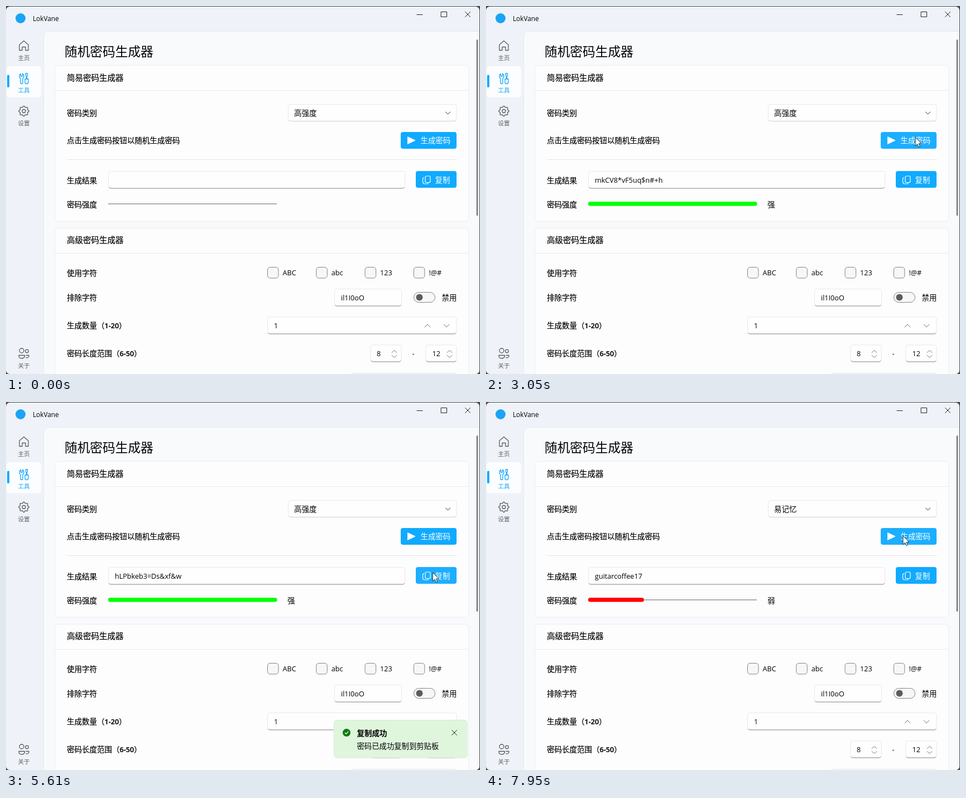
Recreate the animation shown at these times as an HTML page. Size 849x660 px, loop 8 s.

```html
<!DOCTYPE html>
<html lang="zh-CN">
<head>
<meta charset="utf-8">
<title>随机密码生成器</title>
<style>
html, body { margin: 0; width: 100%; height: 100%; overflow: hidden; background: #4a4a4a; }
svg { display: block; width: 849px; height: 660px; }
text { font-family: "Open Sans", "Noto Sans CJK SC", "Noto Sans CJK", sans-serif; fill: #000; white-space: pre; }
.label { font-weight: 500; stroke: #000; stroke-width: .2; }
.icon { fill: none; stroke: #5c5c5c; stroke-width: 1.3; stroke-linecap: round; stroke-linejoin: round; }
.active { stroke: #10a6fb; }
.thin { fill: none; stroke: #777; stroke-width: 1; stroke-linecap: round; stroke-linejoin: round; }
.dark { stroke: #222; }
.field { fill: #fff; fill-opacity: .75; stroke: #e7e8ea; }
.card { fill: #fff; fill-opacity: .7; stroke: #ebedf0; }
.rule { stroke: #e9ebee; }
.check { fill: #f6f7f9; stroke: #858585; }
.white { fill: #fff; }
.accent { fill: #10aaff; }
</style>
</head>
<body>
<svg id="stage" viewBox="0 0 849 660"></svg>
<script>
const LATIN = 12.6, CJK = 13.5;
const text = (x, y, s, size = CJK, attrs = '') =>
  `<text x="${x}" y="${y}" font-size="${size}" ${attrs}>${s}</text>`;
const label = (x, y, s) => text(x, y, s, CJK, 'class="label"');
const rect = (x, y, w, h, r, attrs) =>
  `<rect x="${x}" y="${y}" width="${w}" height="${h}" rx="${r}" ${attrs}/>`;
const path = (d, cls) => `<path d="${d}" class="${cls}"/>`;
const field = (x, y, w, h, edge = '#8c8c8c') => rect(x, y, w, h, 4, 'class="field"') +
  `<path d="M${x + 1} ${y + h - 2}q.6 2 3 2h${w - 8}q2.4 0 3 -2" fill="none" stroke="${edge}"/>`;
const chevron = (x, y, w, h, cls = 'thin') => path(`M${x} ${y}l${w / 2} ${h}l${w / 2} ${-h}`, cls);
const navLabel = (y, s, color = '#5f5f5f') =>
  text(32, y, s, 10.6, `text-anchor="middle" style="fill:${color}"`);
const rangeLabel = (y, s, range) =>
  label(109, y, `${s}（<tspan font-size="${LATIN}" font-weight="600">${range}</tspan>）`);

function gear(cx, cy) {
  const points = [];
  for (let i = 0; i < 32; i++) {
    const a = (i - .5) * Math.PI / 16;
    const r = i % 4 < 2 ? 9 : 7.2;
    points.push(`${(cx + r * Math.cos(a)).toFixed(1)} ${(cy + r * Math.sin(a)).toFixed(1)}`);
  }
  return path(`M${points.join('L')}Z`, 'icon') + `<circle cx="${cx}" cy="${cy}" r="3" class="icon"/>`;
}

const sidebar = [
  '<circle cx="26" cy="22" r="9" fill="#1ba4f5"/>',
  text(48, 27, 'LokVane', 11.8),
  path('M24 69.5L32 62.5L40 69.5V79.5H35V73.5H29V79.5H24Z', 'icon'),
  navLabel(97, '主页'),
  rect(1, 108, 62, 55.5, 5, 'fill="#fff" fill-opacity=".85"'),
  rect(2, 123.5, 4, 22.5, 1.8, 'class="accent"'),
  path('M26.5 121.5v4.5h3v-4.5q2.5 1 2.5 4.5q0 2.5 -2 4v7.5q0 2 -2 2t-2 -2v-7.5q-2 -1.5 -2 -4q0 -3.5 2.5 -4.5z', 'icon active'),
  path('M35.5 121h3v4l-1 2v4h2.5v6q0 2.5 -3 2.5t-3 -2.5v-6h2.5v-4l-1 -2z', 'icon active'),
  navLabel(155, '工具', '#10a6fb'),
  gear(32, 188.5),
  navLabel(214, '设置'),
  '<circle cx="28" cy="618" r="4" class="icon"/><circle cx="37.5" cy="619" r="2.8" class="icon"/>',
  path('M23 626.5H33.5V628Q32.5 632 28 632Q23.5 632 23 628ZM36 626.5H41Q41.5 631 36 631', 'icon'),
  navLabel(649, '关于'),
].join('');

const windowButtons = path('M736 15.5H746M779.5 10.5h10v9h-10zM822.5 10.5l9 9M831.5 10.5l-9 9', 'thin dark');

const simpleCard = [
  rect(87.5, 106.5, 741, 279.5, 6, 'class="card"'),
  '<path d="M88 151.5H828" class="rule"/>',
  text(109, 134, '简易密码生成器', 14.5, 'class="label"'),
  label(109, 197, '密码类别'),
  field(505.5, 176.5, 301.5, 30, '#cfd0d2'),
  text(516, 196.5, '高强度', CJK, 'id="kind"'),
  chevron(787.5, 190, 8, 4, 'thin dark'),
  label(109, 246, '点击生成密码按钮以随机生成密码'),
  '<g id="make">', rect(707, 226, 100, 30, 4, 'class="accent"'),
  '<g><path d="M719.5 234.5V247.5L733 241Z" fill="#fff" stroke="#fff" stroke-linejoin="round"/>',
  text(742.5, 245.5, '生成密码', 13.4, 'class="white"'), '</g></g>',
  '<path d="M109 275.5H808" stroke="#e4e6e8"/>',
  label(109, 318, '生成结果'),
  field(183.5, 296.5, 531, 30.5),
  text(195, 317, '', LATIN, 'id="result"'),
  '<g id="copy">', rect(734, 296, 73, 30, 4, 'class="accent"'), '<g>',
  '<g fill="none" stroke="#fff" stroke-width="1.2"><rect x="751" y="305" width="9" height="11.5" rx="2"/><path d="M749 307.5q-2.5 .5 -2.5 2.5v5q0 4 4 4h3.5q2 0 2.5 -2"/></g>',
  text(768.5, 316.5, '复制', 13.4, 'class="white"'), '</g></g>',
  label(109, 361, '密码强度'),
  '<path d="M183 354.8H485" stroke="#808080" stroke-width="1.3"/>',
  rect(183, 351, 0, 7.6, 3.5, 'id="bar"'),
  text(504, 361, '', CJK, 'id="grade"'),
].join('');

const checks = ['ABC', 'abc', '123', '!@#'].map((s, i) => {
  const x = 468.5 + i * 87.3;
  return rect(x, 468.5, 19.5, 19.5, 4.5, 'class="check"') + text(x + 27, 483, s, LATIN);
}).join('');

const lengthBox = (x, n, textX) => field(x, 608, 55, 30) + text(textX, 628, n, LATIN) +
  chevron(x + 38, 621.5, 9, -4) + chevron(x + 38, 626.5, 9, 4);

const advancedCard = [
  rect(87.5, 398.5, 741, 280, 6, 'class="card"'),
  '<path d="M88 443.5H828" class="rule"/>',
  text(109, 425, '高级密码生成器', 14.5, 'class="label"'),
  label(109, 484, '使用字符'), checks,
  label(109, 528, '排除字符'),
  field(588.5, 507.5, 120, 30.5),
  text(600, 528, 'il1I0oO', LATIN),
  rect(730.5, 513.5, 38, 18, 9, 'class="check"'),
  '<circle cx="740.5" cy="522.5" r="6" fill="#5d5d5d"/>',
  text(780.5, 528, '禁用', 13.4),
  rangeLabel(578, '生成数量', '1-20'),
  field(468.5, 557.5, 338.5, 30.5),
  text(480, 578, '1', LATIN),
  chevron(750, 576, 10, -5), chevron(784, 571, 10, 5),
  rangeLabel(628, '密码长度范围', '6-50'),
  lengthBox(653, '8', 664), text(727.5, 628, '-', LATIN), lengthBox(752, '12', 763.5),
  rect(618.5, 658.5, 189, 20, 4, 'class="field"'),
].join('');

const toast = [
  '<g id="toast">', rect(587.5, 570.5, 238.5, 67.5, 5, 'fill="#dff6dd" stroke="#d5ebd3"'),
  '<circle cx="610" cy="593" r="7" fill="#0f7b0f"/>',
  '<path d="M607 593.2l2.2 2.2l4 -4.4" fill="none" stroke="#fff" stroke-width="1.2"/>',
  text(628.5, 598.5, '复制成功', CJK, 'font-weight="700"'),
  text(628.5, 621.5, '密码已成功复制到剪贴板', 13.35),
  path('M798.5 588.5l9 9M807.5 588.5l-9 9', 'thin dark'), '</g>',
].join('');

const menu = [
  '<g id="menu" clip-path="url(#below)"><g id="sheet">',
  rect(505.5, 210.5, 301, 70.5, 7, 'fill="#f9fbfa" stroke="#dcdddd" filter="url(#shadow)"'),
  '<g id="choice">', rect(511, 217, 290, 28, 5, 'fill="#ebebeb"'),
  rect(511.5, 223.5, 3, 15, 1.5, 'class="accent"'), '</g>',
  text(523.5, 236.5, '高强度'), text(523.5, 267, '易记忆', CJK, 'id="easy"'), '</g></g>',
].join('');

const stage = document.getElementById('stage');
stage.innerHTML = `<defs>
  <clipPath id="below"><rect x="480" y="208" width="360" height="120"/></clipPath>
  <clipPath id="frame"><rect y="1" width="848" height="659" rx="7"/></clipPath>
  <filter id="shadow" x="-10%" y="-20%" width="120%" height="160%">
    <feDropShadow dx="0" dy="4" stdDeviation="5" flood-opacity=".17"/>
  </filter></defs>
  <rect width="849" height="660" fill="#4a4a4a"/>
  <g clip-path="url(#frame)"><rect id="mica" width="849" height="660"/>
  <path d="M849 45.5H76Q67.5 45.5 67.5 54V661H849" fill="#fff" fill-opacity=".6" stroke="#e5e9ee"/>
  ${windowButtons}${sidebar}
  ${text(105, 89.5, '随机密码生成器', 22.7)}
  ${simpleCard}${advancedCard}
  <rect x="842.5" y="60" width="3" height="316" rx="1.5" fill="#858585"/>
  ${toast}${menu}
  <g id="cursor"><circle id="halo" cy="1" r="11.5" fill="#f7ef18" opacity=".72"/>
  <path d="M0 0V15.5L3.6 12.2L6 17.6L8.4 16.5L6 11.3H10.9Z" fill="#fff" stroke="#222" stroke-width=".9" stroke-linejoin="round"/></g></g>`;

const el = {};
stage.querySelectorAll('[id]').forEach(node => { el[node.id] = node; });

// [time, x, y]
const route = [
  [70, 817, 611], [520, 760, 411], [900, 760, 411], [1400, 600, 188], [1680, 640, 190],
  [2100, 742, 234.5], [2600, 742, 234.5], [2850, 769, 235.5], [4110, 769, 235.5],
  [4190, 769, 259], [4430, 765, 306.5], [5590, 765, 306.5], [6040, 650, 187],
  [6400, 650, 187], [6640, 644, 256.5], [7430, 644, 256.5], [7650, 747, 240],
];
const clicks = [[2150, 2230], [3110, 3190], [3650, 3720], [4460, 4540], [6090, 6160], [6710, 6790], [7660, 7740]];
const results = [[0, ''], [2230, 'mkCV8*vF5uq$n#+h'], [3190, 'Tq7+wRz&nd4J!ycb'], [3720, 'hLPbkeb3=Ds&xf&w'], [7740, 'guitarcoffee17']];

const clamp = v => Math.min(1, Math.max(0, v));
const ramp = (t, from, to) => clamp((t - from) / (to - from));
const easeOut = p => 1 - (1 - p) * (1 - p);
const easeInOut = p => p * p * (3 - 2 * p);
const show = (node, on) => node.setAttribute('visibility', on ? 'visible' : 'hidden');

function pointer(t) {
  let i = 0;
  while (i < route.length - 2 && t >= route[i + 1][0]) i++;
  const [t0, x0, y0] = route[i], [t1, x1, y1] = route[i + 1];
  const p = easeInOut(ramp(t, t0, t1));
  return [x0 + (x1 - x0) * p, y0 + (y1 - y0) * p];
}

function paintButton(button, left, top, right, bottom, x, y, pressed) {
  const hover = x >= left && x <= right && y >= top && y <= bottom;
  const [face, content] = button.children;
  face.style.fill = hover ? (pressed ? '#62caff' : '#1caeff') : '#10aaff';
  content.setAttribute('opacity', hover && pressed ? .65 : 1);
}

function render(t) {
  const [x, y] = pointer(t);
  const pressed = clicks.some(([down, up]) => t >= down && t < up);
  const menuOpen = t >= 6160 && t < 6790;
  show(el.cursor, t >= 70);
  el.cursor.setAttribute('transform', `translate(${x} ${y})`);
  show(el.halo, pressed);
  paintButton(el.make, 707, 225, 808, 256, x, y, pressed);
  paintButton(el.copy, 733, 296, 808, 327, x, y, pressed);

  const inactive = ramp(t, 1750, 1900) - ramp(t, 2230, 2440);
  el.mica.setAttribute('fill', `rgb(${239 + 4 * inactive},${243 + inactive},${249 - 3 * inactive})`);

  el.result.textContent = results.filter(([start]) => t >= start).pop()[1];
  const weak = t >= 7740;
  const level = ramp(t, 2230, 2380) - .67 * ramp(t, 7740, 7890);
  el.bar.setAttribute('width', 302.5 * level);
  el.bar.setAttribute('fill', weak ? '#f00' : '#0f0');
  el.grade.textContent = weak ? '弱' : t >= 2230 ? '强' : '';
  el.kind.textContent = t >= 6790 ? '易记忆' : '高强度';

  show(el.menu, menuOpen);
  el.sheet.setAttribute('transform', `translate(0 ${-36 * (1 - easeOut(ramp(t, 6160, 6370)))})`);
  el.choice.setAttribute('transform', `translate(0 ${y > 245 ? 31 : 0})`);
  el.easy.style.fill = pressed ? '#606060' : '#000';

  show(el.toast, t >= 4540 && t < 6860);
  el.toast.setAttribute('transform', `translate(${262 * (1 - easeOut(ramp(t, 4540, 4780)))} 0)`);
  el.toast.setAttribute('opacity', 1 - ramp(t, 6620, 6860));
}

const start = performance.now();
function tick() {
  render((performance.now() - start) % 8000);
  requestAnimationFrame(tick);
}
tick();
</script>
</body>
</html>
```
